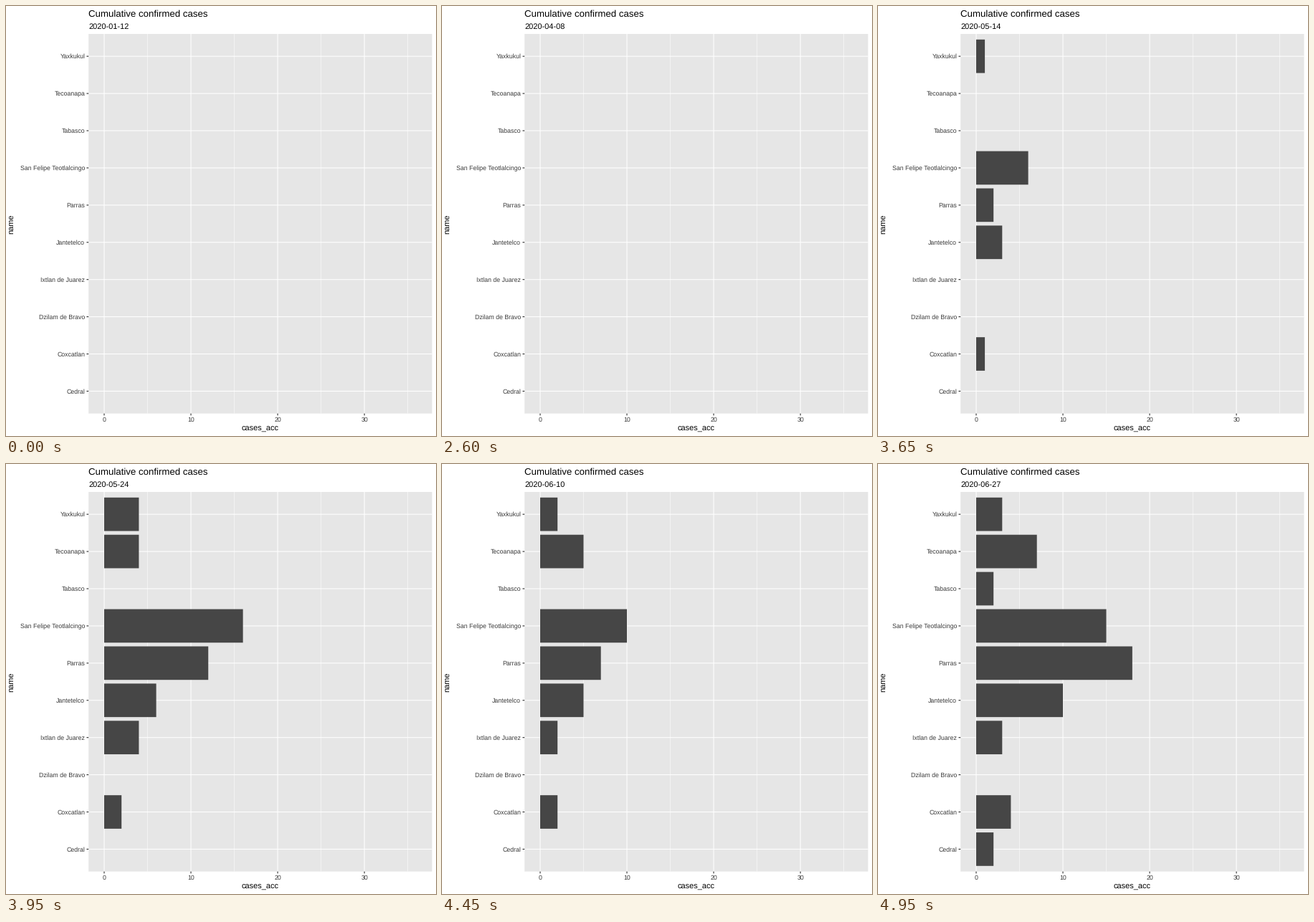
A matplotlib script for the animation above (5 s loop, 600 by 600 pixels).

```python
import matplotlib.pyplot as plt
import numpy as np
from matplotlib.animation import FuncAnimation
from matplotlib.patches import Rectangle

plt.rcParams.update({
    "font.family": "Liberation Sans",
    "text.hinting": "none",
    "toolbar": "None",
})

SIZE = 600
FRAMES, INTERVAL = 100, 50
START, LAST_DAY = np.datetime64("2020-01-12"), 167

# Panel edges in pixels, y pointing down
LEFT, RIGHT, TOP, BOTTOM = 115.2, 594.5, 39.0, 568.6
UNIT = (RIGHT - LEFT) / 39.6
ROW = (BOTTOM - TOP) / 10.2
BAR = 0.9 * ROW

PANEL, FILL, LABEL, TICK = "#e6e6e6", "#464646", "#3b3b3b", "#242424"

# Days on which each town reports one more case, bottom row first
CASE_DAYS = {
    "Cedral": [154, 162],
    "Coxcatlan": [116, 141, 153, 160],
    "Dzilam de Bravo": [],
    "Ixtlan de Juarez": [125, 129, 157],
    "Jantetelco": [96, 103, 116, 140, 147, 152, 155, 158, 161, 164],
    "Parras": [110, 118, 125, 127, 129, 131, 140, 151, 152, 154,
               155, 156, 158, 159, 160, 162, 163, 165],
    "San Felipe Teotlalcingo": [98, 105, 109, 114, 118, 122, 131, 132,
                                138, 150, 152, 155, 158, 161, 164],
    "Tabasco": [156, 163],
    "Tecoanapa": [124, 129, 138, 142, 147, 155, 162],
    "Yaxkukul": [119, 128, 160],
}


def px(cases):
    return LEFT + (1.8 + cases) * UNIT


def py(row):
    return BOTTOM - (0.6 + row) * ROW


# Each day lands on its nearest frame; days sharing a frame are stacked
days = np.arange(LAST_DAY + 1)
slots = np.rint(days * (FRAMES - 1) / LAST_DAY).astype(int)
lengths = np.zeros((FRAMES, len(CASE_DAYS)))
for row, steps in enumerate(CASE_DAYS.values()):
    total = np.searchsorted(steps, days, side="right")
    np.add.at(lengths[:, row], slots, total)

fig = plt.figure(figsize=(SIZE / 72, SIZE / 72), dpi=72, facecolor="white")
ax = fig.add_axes([0, 0, 1, 1])
ax.set_xlim(0, SIZE)
ax.set_ylim(SIZE, 0)
ax.axis("off")


def rect(x, y, w, h, color, z):
    patch = Rectangle((x, y), w, h, facecolor=color, linewidth=0,
                      snap=False, zorder=z)
    ax.add_patch(patch)
    return patch


def line(xs, ys, color, width, z):
    ax.plot(xs, ys, color=color, lw=width, solid_capstyle="butt",
            snap=False, zorder=z)


def text(x, y, s, size, color="black", **kw):
    return ax.text(x, y, s, fontsize=size, color=color, va="baseline", **kw)


rect(LEFT, TOP, RIGHT - LEFT, BOTTOM - TOP, PANEL, 0)

for value in range(5, 36, 10):
    line([px(value)] * 2, [TOP, BOTTOM], "white", 0.53, 1)

for row, name in enumerate(CASE_DAYS):
    y = py(row)
    line([LEFT, RIGHT], [y, y], "white", 1.07, 2)
    line([LEFT - 2.75, LEFT], [y, y], TICK, 1.07, 2)
    text(LEFT - 4.95, y + 3.15, name, 8.8, LABEL, ha="right")

for value in range(0, 31, 10):
    x = px(value)
    line([x, x], [TOP, BOTTOM], "white", 1.07, 2)
    line([x, x], [BOTTOM, BOTTOM + 2.75], TICK, 1.07, 2)
    text(x, 580, str(value), 8.8, LABEL, ha="center")

text(LEFT, 15, "Cumulative confirmed cases", 13.2)
date = text(LEFT, 32, "", 11)
text((LEFT + RIGHT) / 2, 593, "cases_acc", 11, ha="center")
ax.text(13, (TOP + BOTTOM) / 2, "name", fontsize=11, rotation=90,
        ha="right", va="center")

bars = [rect(px(0), py(row) - BAR / 2, 0, BAR, FILL, 3)
        for row in range(len(CASE_DAYS))]


def update(frame):
    date.set_text(str(START + LAST_DAY * frame // (FRAMES - 1)))
    for bar, cases in zip(bars, lengths[frame]):
        bar.set_width(cases * UNIT)
        bar.set_visible(cases > 0)
    return [date, *bars]


anim = FuncAnimation(fig, update, frames=FRAMES, interval=INTERVAL,
                     repeat=True, repeat_delay=0)
plt.show()
```
